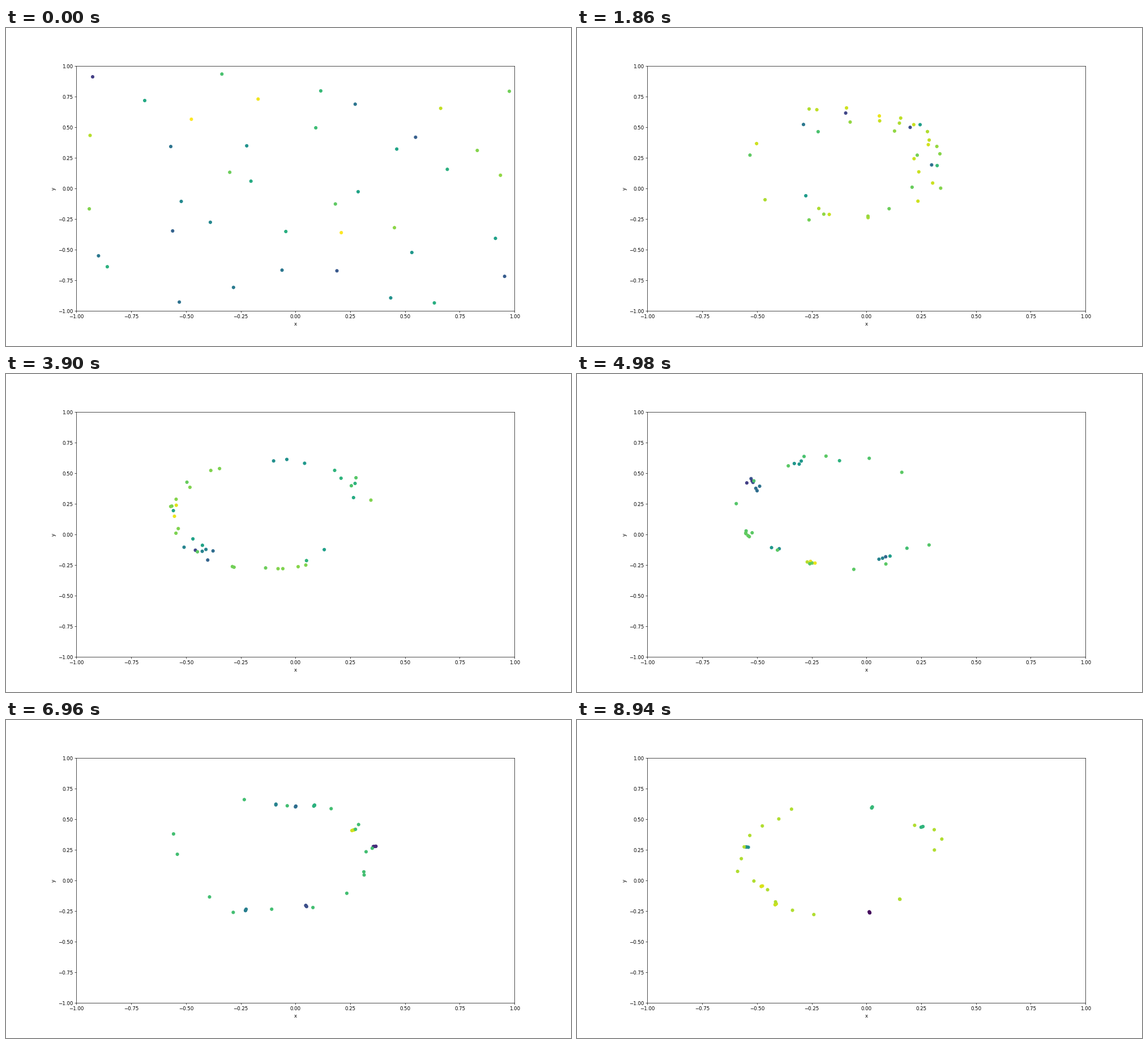
These frames come from a looping animation (998x561 px, 9000 ms). A matplotlib script:

```python
import numpy as np
import matplotlib.pyplot as plt
from matplotlib.animation import FuncAnimation

W, H, DPI = 998, 561, 62.375
FRAMES, STEP = 150, 60
CENTER = np.array([-0.115, 0.19])
RING = 0.45
SPIN = np.radians(4.2)      # turn per frame
ENTRY, PACKED = 17, 102     # the ring forms, the clumps are tight

# size, turning sense, closing angle in degrees, early shade, late shade
CLUMPS = [
    (4, 1, 169, .97, .50),
    (4, -1, 232, .05, .92),
    (3, 1, 213, .30, .94),
    (3, 1, 71, .20, .67),
    (3, 1, 34, .40, .65),
    (2, -1, -52, .40, .88),
    (5, -1, -74, .70, .03),
]
LONERS = np.append(np.linspace(8, 38, 4), np.linspace(120, 255, 12))

rng = np.random.default_rng(12)
groups = CLUMPS + [(1, (-1)**k, a, .68, .88) for k, a in enumerate(LONERS)]
sizes = [g[0] for g in groups]
_, sense, closing, early, late = np.repeat(np.array(groups), sizes, axis=0).T
closing = np.radians(closing)
N = len(sense)

ring = np.repeat(RING + rng.uniform(-.03, .04, len(groups)), sizes)
ring += rng.uniform(-.006, .006, N)
spread = np.radians(np.concatenate([70 * (2 * np.arange(n) - n + 1) / n for n in sizes]))
spread += rng.uniform(-.2, .2, N)
inward = .3 * rng.random(N)**3
fresh = .97 - .9 * rng.random(N)**4


def orbit(i):
    """Angle and radius of every dot once the ring has formed."""
    loose = max(0, (PACKED - i) / (PACKED - ENTRY))**2
    angle = closing - sense * SPIN * (FRAMES - 1 - i) + spread * loose
    return angle, ring - inward * np.exp((ENTRY - i) / 25)


def place(angle, radius):
    return CENTER + (radius * np.array([np.cos(angle), np.sin(angle)])).T


def mix(a, b, s):
    return a + (b - a) * s


def scatter_start():
    """One dot in each cell of an 8 by 5 grid, ordered to suit the orbits."""
    col, row = np.divmod(np.arange(N), 5)
    cell = np.stack([col, row], axis=1) + rng.uniform(.08, .92, (N, 2))
    xy = cell * [2 / 8, 2 / 5] - 1
    bearing = np.arctan2(*(xy - CENTER).T[::-1])
    ahead = np.angle(np.exp(1j * orbit(ENTRY)[0]))
    out = np.empty_like(xy)
    out[np.argsort(ahead)] = xy[np.argsort(bearing)]
    return out


start = scatter_start()
start_shade = np.clip(rng.normal(.58, .22, N), 0, 1)
entry = place(*orbit(ENTRY))
first_pull = .8 * (entry - start)
last_pull = ENTRY * (place(*orbit(ENTRY + 1)) - entry)


def gather(s):
    """Curve from the scattered start into the orbits, 0 <= s <= 1."""
    return (mix(start, entry, s * s * (3 - 2 * s))
            + first_pull * s * (1 - s)**2 - last_pull * s * s * (1 - s))


def swarm(i):
    if i < ENTRY:
        s = i / ENTRY
        return gather(s), mix(start_shade, fresh, s)
    if i < PACKED:
        shade = mix(fresh, early, (i - ENTRY) / (PACKED - ENTRY))
    else:
        shade = mix(early, late, ((i - PACKED) / (FRAMES - 1 - PACKED))**2)
    return place(*orbit(i)), shade


fig, ax = plt.subplots(figsize=(W / DPI, H / DPI), dpi=DPI)
fig.subplots_adjust(left=124.4 / W)
ticks = np.linspace(-1, 1, 9)
ax.set(xlim=(-1, 1), ylim=(-1, 1), xticks=ticks, yticks=ticks, xlabel="x", ylabel="y")
dots = ax.scatter(*start.T, c=start_shade, cmap="viridis", vmin=0, vmax=1)


def draw(i):
    xy, shade = swarm(i)
    dots.set_offsets(xy)
    dots.set_array(shade)
    return dots,


anim = FuncAnimation(fig, draw, frames=FRAMES, interval=STEP, repeat=True, repeat_delay=0)
plt.show()
```
